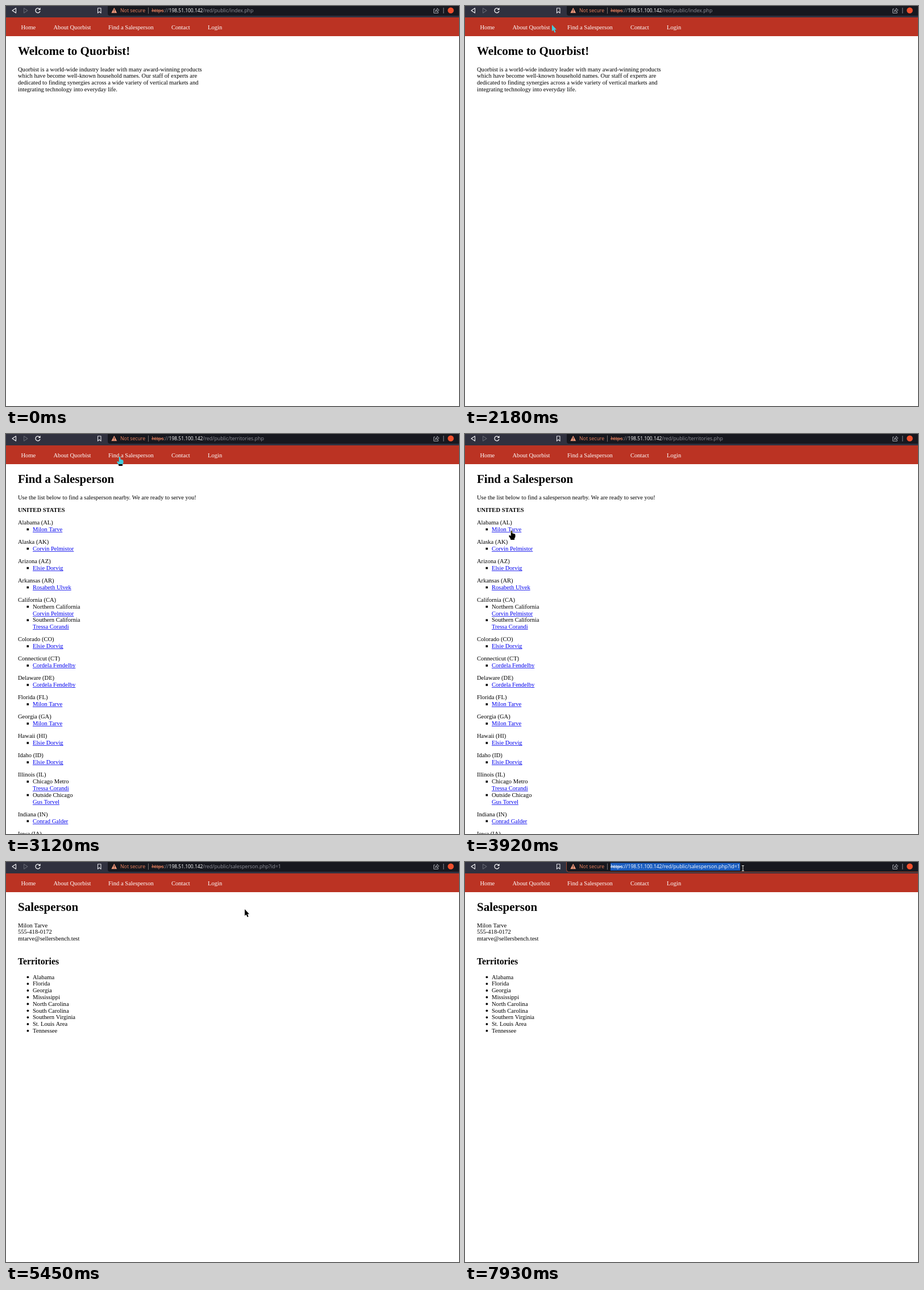
An HTML page with a canvas for the animation above (7990 ms loop, 797 by 703 pixels).

```html
<!DOCTYPE html>
<html lang="en">
<head>
<meta charset="utf-8">
<title>Company site tour</title>
<style>
html, body { margin: 0; width: 100%; height: 100%; overflow: hidden; background: #fff; }
canvas { display: block; width: 797px; height: 703px; }
</style>
</head>
<body>
<canvas id="stage" width="797" height="703"></canvas>
<script>
const W = 797, H = 703, LOOP = 7990;
const ctx = document.getElementById('stage').getContext('2d');

const SERIF = '"Liberation Serif", "Times New Roman", serif';
const SANS = '"Open Sans", "Noto Sans", sans-serif';
const BODY = `10.56px ${SERIF}`;
const BOLD = `bold 10.56px ${SERIF}`;
const H1 = `bold 21px ${SERIF}`;
const H2 = `bold 15.75px ${SERIF}`;
const LEFT = 21, INDENT = 47, LINE = 11.8, GAP = 22.2, TOP = 114.5;

function text(str, x, y, font = BODY, color = '#000') {
  ctx.font = font;
  ctx.fillStyle = color;
  ctx.fillText(str, x, y);
}

function rect(x, y, w, h, color) {
  ctx.fillStyle = color;
  ctx.fillRect(x, y, w, h);
}

function stroke(color, width, build) {
  ctx.strokeStyle = color;
  ctx.lineWidth = width;
  ctx.beginPath();
  build(ctx);
  ctx.stroke();
}

function poly(points, x = 0, y = 0) {
  ctx.beginPath();
  points.forEach(([px, py]) => ctx.lineTo(x + px, y + py));
  ctx.closePath();
}

function dot(x, y, r, color) {
  ctx.fillStyle = color;
  ctx.beginPath();
  ctx.arc(x, y, r, 0, Math.PI * 2);
  ctx.fill();
}

// Draws lines downwards and returns the baseline after the last one.
function lines(list, x, y) {
  list.forEach(s => { text(s, x, y); y += LINE; });
  return y;
}

function link(str, x, y) {
  text(str, x, y, BODY, '#0000ee');
  rect(x, Math.round(y + 1), ctx.measureText(str).width, 0.8, '#0000ee');
}

/* ---------- pages ---------- */

function homePage() {
  text('Welcome to Quorbist!', LEFT, 86, H1);
  lines([
    'Quorbist is a world-wide industry leader with many award-winning products',
    'which have become well-known household names. Our staff of experts are',
    'dedicated to finding synergies across a wide variety of vertical markets and',
    'integrating technology into everyday life.'
  ], LEFT, TOP);
}

const STORY = [
  ['Quorbist started as a small company with a different name. Ombervan Grist',
   'Corporation was founded in 1880 by Tovin Huldersen, a wheat farmer in',
   'Western Minnesota. Tovin and his three sons expanded their family business',
   'over the next four decades to become a market leader across a wide number',
   'of agricultural markets.'],
  ['Beginning in 1925, OmGrist began acquiring a number of competitors to',
   'gain access to key patents. These patents allowed OmGrist to push',
   'aggressively into exciting new markets. The company merged with The V.P.',
   'Tramway and Lathe Company in 1940 to become Dovrel Industries, Inc. The',
   'larger enterprise was one of the first companies listed on the Nev Varns',
   'Provincial Average.'],
  ['In 1981, the company rebranded itself as Quorbist. The firm employs over',
   '80,000 people in the United States and another 20,000 across 30 other',
   'countries.']
];

function aboutPage() {
  text('About Quorbist', LEFT, 86, H1);
  let y = TOP;
  STORY.forEach(p => { y = lines(p, LEFT, y) + GAP - LINE; });
  rect(LEFT, 301, W - LEFT, 1, '#9a9a9a');
  text('Headquarters', LEFT, 329.5, H2);
  lines(['New York', '572 Vost 46th Street'], LEFT, 366.5);
  lines(['London', '418C Dolve Street, QX7'], 127.5, 366.5);
  lines(['Hong Kong', '58 Harvelmo Road, Tsanwei'], 254, 366.5);
}

const MILON = 'Milon Tarve', CORVIN = 'Corvin Pelmistor', ELSIE = 'Elsie Dorvig',
      TRESSA = 'Tressa Corandi', CORDELA = 'Cordela Fendelby';

// State, then either one seller or pairs of area and seller.
const STATES = [
  ['Alabama (AL)', MILON],
  ['Alaska (AK)', CORVIN],
  ['Arizona (AZ)', ELSIE],
  ['Arkansas (AR)', 'Rosabeth Ulvek'],
  ['California (CA)', 'Northern California', CORVIN, 'Southern California', TRESSA],
  ['Colorado (CO)', ELSIE],
  ['Connecticut (CT)', CORDELA],
  ['Delaware (DE)', CORDELA],
  ['Florida (FL)', MILON],
  ['Georgia (GA)', MILON],
  ['Hawaii (HI)', ELSIE],
  ['Idaho (ID)', ELSIE],
  ['Illinois (IL)', 'Chicago Metro', TRESSA, 'Outside Chicago', 'Gus Torvel'],
  ['Indiana (IN)', 'Conrad Galder'],
  ['Iowa (IA)']
];

function territoriesPage() {
  text('Find a Salesperson', LEFT, 86, H1);
  text('Use the list below to find a salesperson nearby. We are ready to serve you!', LEFT, TOP);
  text('UNITED STATES', LEFT, 136.7, BOLD);
  let y = 159;
  STATES.forEach(([state, ...rows]) => {
    text(state, LEFT, y);
    const single = rows.length === 1;
    rows.forEach((row, i) => {
      y += LINE;
      if (single || i % 2) link(row, INDENT, y);
      else text(row, INDENT, y);
      if (i % 2 === 0) rect(36.5, y - 5, 3.6, 3.6, '#000');
    });
    y += GAP;
  });
}

function sellerPage() {
  text('Salesperson', LEFT, 86, H1);
  lines([MILON, '555-418-0172', 'mtarve@sellersbench.test'], LEFT, TOP);
  text('Territories', LEFT, 179.5, H2);
  const areas = ['Alabama', 'Florida', 'Georgia', 'Mississippi', 'North Carolina',
    'South Carolina', 'Southern Virginia', 'St. Louis Area', 'Tennessee'];
  lines(areas, INDENT, 205.5);
  areas.forEach((_, i) => dot(38.4, 202.3 + i * LINE, 1.9, '#000'));
}

const PAGES = [
  { from: 0, file: 'index.php', draw: homePage },
  { from: 2450, file: 'about.php', draw: aboutPage },
  { from: 2910, file: 'territories.php', draw: territoriesPage },
  { from: 4180, file: 'salesperson.php?id=1', draw: sellerPage }
];
const LOADING = [[2375, 2450], [2710, 2910], [4050, 4180]];
const SELECT_AT = 6980;

/* ---------- browser bar ---------- */

function navIcons(loading) {
  ctx.lineJoin = 'round';
  [['#f2f2f5', 14.5, -1], ['#62646f', 34.5, 1]].forEach(([color, x, dir]) =>
    stroke(color, 1.1, c => {
      c.moveTo(x + 3.5 * dir, 8);
      c.lineTo(x - 3 * dir, 3.8);
      c.lineTo(x - 3 * dir, 12.2);
      c.closePath();
    }));
  if (loading) {
    stroke('#f2f2f5', 1.2, c => {
      c.moveTo(52, 4); c.lineTo(60, 12);
      c.moveTo(60, 4); c.lineTo(52, 12);
    });
  } else {
    stroke('#f2f2f5', 1.3, c => c.arc(56, 8, 4, 0.2, 5.5));
    poly([[60.6, 2.8], [60.6, 7], [56.6, 7]]);
    ctx.fillStyle = '#f2f2f5';
    ctx.fill();
  }
  stroke('#e4e4ea', 1.1, c => {
    c.moveTo(161.5, 3.8); c.lineTo(167, 3.8); c.lineTo(167, 12.4);
    c.lineTo(164.2, 9.8); c.lineTo(161.5, 12.4); c.closePath();
  });
}

function shareIcon() {
  stroke('#a9aab2', 1, c => {
    c.moveTo(755, 5.2); c.lineTo(752.7, 5.2); c.lineTo(752.7, 12.4);
    c.lineTo(760.3, 12.4); c.lineTo(760.3, 10);
    c.moveTo(755, 10); c.quadraticCurveTo(755.4, 6.5, 758.6, 6.2);
    c.lineTo(758.6, 4); c.lineTo(762, 7.2); c.lineTo(758.6, 10);
    c.lineTo(758.6, 8.2); c.quadraticCurveTo(756.4, 8.2, 755, 10);
  });
}

function address(file, selected) {
  const font = `8.8px ${SANS}`, base = 11.2;
  const path = '/red/public/' + file;
  if (selected) rect(256, 1.5, 228, 13.5, '#1a5dc0');
  const soft = selected ? '#ffffff' : '#92939c';
  const scheme = selected ? '#ffffff' : '#ee8460';
  text('https', 256.2, base, font, scheme);
  rect(256, 8, 21.5, 1, scheme);
  text('://', 277.4, base, font, soft);
  text('198.51.100.142', 286.6, base, `8.45px ${SANS}`, '#ffffff');
  text(path, 346.2, base, font, soft);
}

function browserBar(file, loading, hover, selected) {
  rect(0, 0, W, 20, '#30313f');
  ctx.fillStyle = hover && !selected ? '#23242d' : '#17181f';
  ctx.beginPath();
  ctx.roundRect(179, -8, W - 179 + 8, 25, 4);
  ctx.fill();
  if (selected) {
    stroke('#a2482f', 1, c => c.roundRect(178.5, -8, W - 178 + 10, 25.5, 4));
  }
  navIcons(loading);
  poly([[190.3, 3], [195.2, 12.2], [185.4, 12.2]]);
  ctx.fillStyle = '#f39a7c';
  ctx.fill();
  rect(189.8, 6, 1, 3.2, '#17181f');
  rect(189.8, 10, 1, 1, '#17181f');
  text('Not secure', 201, 11.2, `8.75px ${SANS}`, '#ee8460');
  rect(250, 2.5, 1, 11, '#77706f');
  address(file, selected);
  shareIcon();
  rect(769.3, 3, 1, 10, '#8a8b94');
  dot(782.5, 7.7, 5.3, '#f0502d');
}

function siteMenu() {
  rect(0, 20, W, 33, '#bb3323');
  [['Home', 26.5], ['About Quorbist', 83.5], ['Find a Salesperson', 180],
   ['Contact', 291], ['Login', 355]].forEach(([s, x]) => text(s, x, 40.7, BODY, '#fff'));
}

/* ---------- pointer ---------- */

const ARROW = [[0, 0], [0, 11.6], [2.6, 9.3], [4.6, 13.8], [6.6, 12.9], [4.7, 8.6], [8, 8.4]];
const HAND = [[-1.3, 0.6], [0, 0], [1.2, 0.6], [1.4, 4.4], [5.4, 5.5], [6.5, 7], [6.5, 11],
  [5, 13.5], [5, 16], [-1.6, 16], [-2, 14], [-4.6, 10], [-4.5, 8.2], [-3, 8], [-1.3, 9.6]];

// Time, position and, where it changes, the pointer kind.
const MOVES = [
  [245, 741, 690, 'arrow'],
  [520, 153, 119], [710, 153, 119],
  [980, 95, 59], [1050, 95, 59],
  [1115, 97, 54], [1180, 104, 42, 'hand'],
  [1320, 106, 33], [1570, 106, 33],
  [1780, 112, 40], [2050, 140, 32, 'arrow'],
  [2310, 165, 34], [2500, 184, 37, 'hand'],
  [2780, 200, 39], [3110, 200, 39],
  [3200, 205, 56, 'arrow'],
  [3780, 86, 169, 'hand'],
  [3860, 82, 170], [5110, 82, 170],
  [5190, 92, 190, 'arrow'],
  [5450, 420, 83],
  [5700, 454, 46], [5850, 466, 9], [5990, 474, 10],
  [6250, 489, 27], [6460, 481, 18],
  [6660, 488, 9], [6900, 493, 11], [7390, 492, 11],
  [7855, 492, 11], [7925, 489, 11]
];

function pointerAt(t) {
  if (t < MOVES[0][0]) return null;
  let i = 0, kind = 'arrow';
  while (i < MOVES.length && MOVES[i][0] <= t) kind = MOVES[i++][3] || kind;
  const a = MOVES[i - 1], b = MOVES[i] || a;
  const k = b === a ? 0 : (t - a[0]) / (b[0] - a[0]);
  const x = a[1] + (b[1] - a[1]) * k, y = a[2] + (b[2] - a[2]) * k;
  return { x, y, kind: y < 17 ? 'beam' : kind, overBar: y < 19 };
}

// The pointer inverts whatever lies below it.
function drawPointer({ x, y, kind }) {
  ctx.save();
  ctx.globalCompositeOperation = 'difference';
  ctx.fillStyle = '#fff';
  x = Math.round(x);
  y = Math.round(y);
  if (kind === 'beam') {
    ctx.fillRect(x - 0.5, y - 4, 1, 8);
    ctx.fillRect(x - 2, y - 5, 4, 1);
    ctx.fillRect(x - 2, y + 4, 4, 1);
  } else {
    poly(kind === 'hand' ? HAND : ARROW, x, y);
    ctx.fill();
  }
  ctx.restore();
}

function draw(time) {
  const step = 1000 / 15;
  const t = 250 + Math.floor((time - 250 + 4) / step) * step;
  const page = PAGES.filter(p => p.from <= Math.max(0, t)).pop();
  const pointer = pointerAt(t);
  const loading = LOADING.some(([a, b]) => t >= a && t < b);

  rect(0, 0, W, H, '#fff');
  page.draw();
  siteMenu();
  browserBar(page.file, loading, pointer && pointer.overBar, t >= SELECT_AT);
  if (pointer) drawPointer(pointer);
}

const start = performance.now();
function tick() {
  draw((performance.now() - start) % LOOP);
  requestAnimationFrame(tick);
}
tick();
</script>
</body>
</html>
```
